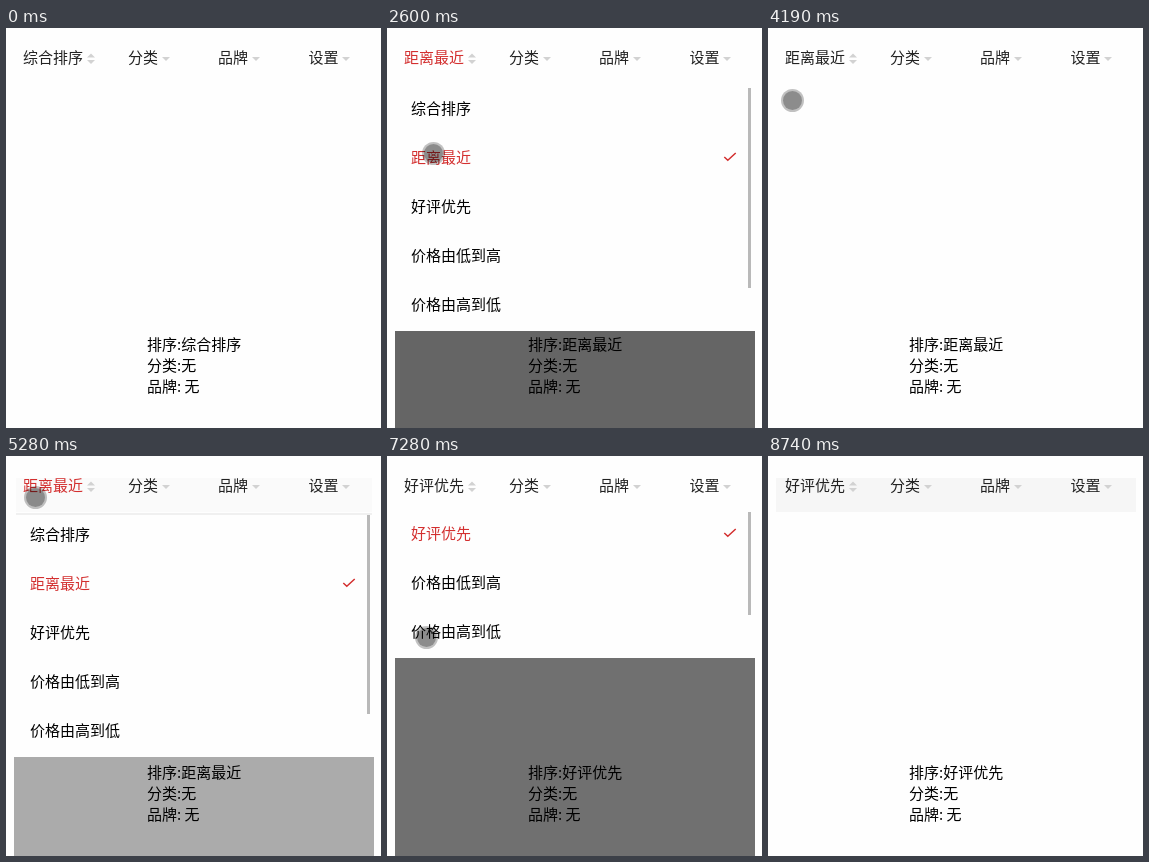
An HTML page with a canvas that plays this animation: 375 by 400 pixels, repeating every 9170 ms.

```html
<!DOCTYPE html>
<html lang="zh-CN">
<head>
<meta charset="utf-8">
<style>
html, body { margin: 0; width: 100%; height: 100%; overflow: hidden; background: #fefefe; }
canvas { display: block; }
</style>
</head>
<body>
<canvas id="stage" width="375" height="400"></canvas>
<script>
const ctx = document.getElementById('stage').getContext('2d');
const LOOP = 9170;
const RED = '#d32f2f';
const FONT = '15px "Noto Sans CJK SC", "Noto Sans CJK", "Noto Sans", sans-serif';
const OPTIONS = ['综合排序', '距离最近', '好评优先', '价格由低到高', '价格由高到低'];
const TABS = [['分类', 122], ['品牌', 212], ['设置', 302.5]];
const TOP = 56, PANEL = 247;

const TICKS = [0, 280, 440, 560, 710, 960, 1080, 1220, 1340, 1490, 1610, 1730, 1850,
  2600, 3150, 3270, 3390, 3510, 3660, 4190, 4340, 4460, 4580, 5000, 5120, 5280, 5400,
  5540, 5660, 5780, 5900, 6020, 6170, 6630, 7280, 7400, 7520, 7650, 7800, 8230];

// Pointer path: time, x, y
const PATH = [[280, 61.5, 60.5], [560, 36, 34], [710, 37, 33.5], [1370, 37, 33.5],
  [1850, 46.5, 125.5], [4189, 46.5, 125.5], [4190, 24.5, 72.5], [4580, 29.5, 41.5],
  [5420, 29.5, 41.5], [6020, 39.5, 180.5], [6170, 39.5, 181.5], [8230, 39.5, 181.5]];

const SESSIONS = [{ open: 900, close: 3127 }, { open: 4960, close: 7216 }];

const clamp = v => Math.max(0, Math.min(1, v));
const easeOut = u => 1 - Math.pow(1 - clamp(u), 3);

function pointerAt(t) {
  if (t < PATH[0][0] || t >= 8230) return null;
  const i = PATH.findIndex(p => p[0] > t);
  const [t0, x0, y0] = PATH[i - 1], [t1, x1, y1] = PATH[i];
  const u = (t - t0) / (t1 - t0);
  return [x0 + (x1 - x0) * u, y0 + (y1 - y0) * u];
}

function menuAt(t) {
  const s = SESSIONS.find(s => t >= s.open && t < s.close + 440);
  if (!s) return null;
  if (t < s.close) {
    const e = t - s.open;
    return {
      active: true,
      shift: PANEL * (easeOut(e / 400) - 1),
      dim: 0.6 * Math.pow(clamp(e / 440), 1.9)
    };
  }
  const e = t - s.close;
  return {
    active: false,
    shift: -PANEL * easeOut(e / 400),
    dim: 0.6 * (1 - Math.pow(clamp(e / 430), 1.4))
  };
}

function rect(x, y, w, h, color) {
  ctx.fillStyle = color;
  ctx.fillRect(x, y, w, h);
}

function label(str, x, y, color = '#000', weight = 500) {
  ctx.font = weight + ' ' + FONT;
  ctx.fillStyle = color;
  ctx.fillText(str, x, y);
}

function arrow(x, y, h) {
  ctx.fillStyle = '#d2d2d2';
  ctx.beginPath();
  ctx.moveTo(x, y);
  ctx.lineTo(x + 8, y);
  ctx.lineTo(x + 4, y + h);
  ctx.fill();
}

function disc(x, y, r, color) {
  ctx.fillStyle = color;
  ctx.beginPath();
  ctx.arc(x, y, r, 0, Math.PI * 2);
  ctx.fill();
}

function check(y) {
  ctx.strokeStyle = RED;
  ctx.lineWidth = 1.5;
  ctx.beginPath();
  ctx.moveTo(337.3, y);
  ctx.lineTo(340.8, y + 3.3);
  ctx.lineTo(348.7, y - 4);
  ctx.stroke();
}

function drawMenu(menu, sel) {
  rect(8, TOP, 360, 400 - TOP, `rgba(0,0,0,${menu.dim})`);
  label('排序:' + OPTIONS[sel], 141, 322);
  label('分类:无', 141, 343);
  label('品牌: 无', 141, 364);
  ctx.save();
  ctx.beginPath();
  ctx.rect(8, TOP, 360, 400 - TOP);
  ctx.clip();
  ctx.translate(0, Math.round(menu.shift));
  rect(8, TOP, 360, PANEL, '#fefefe');
  OPTIONS.forEach((name, i) => label(name, 24, 86 + 49 * i, i === sel ? RED : '#000'));
  check(129 + 49 * (sel - 1));
  rect(361, 60, 3, 200, '#b9b9b9');
  ctx.restore();
}

function drawHeader(t, menu, sel) {
  if (t >= 7650) rect(8, 22, 360, 34, '#f6f6f6');
  if (menu && menu.active && menu.dim < 0.4) {
    rect(10, 22, 356, 34, '#fafafa');
    rect(10, 57, 356, 2, '#f0f0f0');
  }
  label(OPTIONS[sel], 17, 35, menu && menu.active ? RED : '#222', 400);
  arrow(81, 29.5, -4);
  arrow(81, 32, 4);
  for (const [name, x] of TABS) {
    label(name, x, 35, '#222', 400);
    arrow(Math.floor(x) + 34, 29, 4);
  }
}

function draw(time) {
  const t = TICKS.filter(k => k <= time).pop();
  const sel = t < 2600 ? 0 : t < 6630 ? 1 : 2;
  const menu = menuAt(t);
  rect(0, 0, 375, 400, '#fefefe');
  drawMenu(menu || { shift: -PANEL, dim: 0 }, sel);
  drawHeader(t, menu, sel);
  const p = pointerAt(t);
  if (p) {
    disc(p[0], p[1], 11.5, 'rgba(0,0,0,0.24)');
    disc(p[0], p[1], 9.5, 'rgba(0,0,0,0.27)');
  }
}

const start = performance.now();
function loop() {
  draw((performance.now() - start) % LOOP);
  requestAnimationFrame(loop);
}
loop();
</script>
</body>
</html>
```
